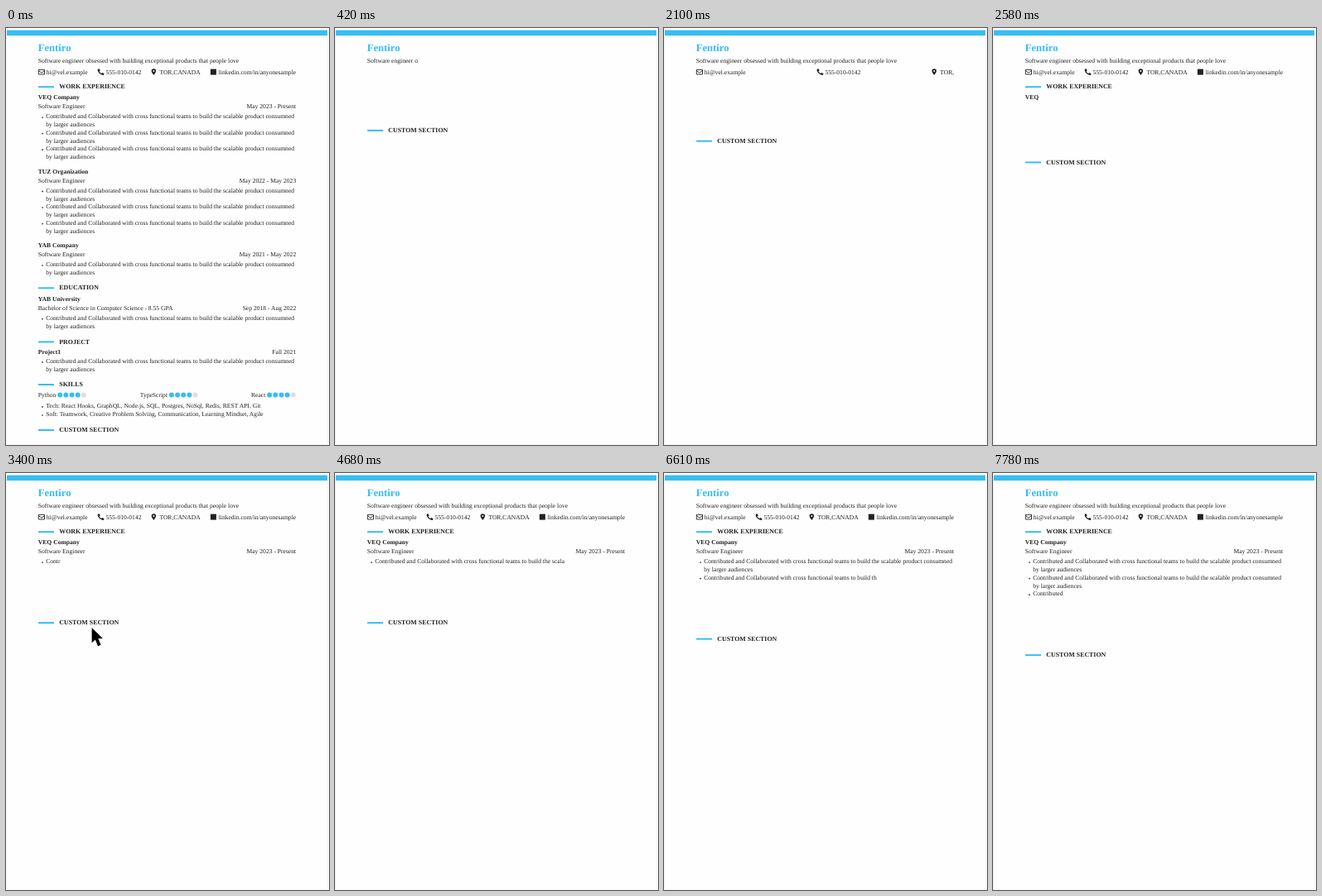
Recreate the animation shown at these times as an HTML page. Size 390 by 504 pixels, loop 8000 ms.

```html
<!DOCTYPE html>
<html lang="en">
<head>
<meta charset="utf-8">
<title>Resume typing</title>
<style>
html, body { margin: 0; width: 100%; height: 100%; overflow: hidden; background: #fefefe; }
svg { display: block; width: 390px; height: 504px; }
text {
  font: 7.6px "Liberation Serif", serif;
  fill: #222;
  white-space: pre;
  text-rendering: geometricPrecision;
}
.bold { font-weight: bold; }
.head { font-weight: bold; font-size: 7.9px; }
.name { font-weight: bold; font-size: 12.65px; fill: #38bdf2; }
.right { text-anchor: end; }
.accent { fill: #38bdf2; }
.ink { fill: #222; }
</style>
</head>
<body>
<svg viewBox="0 0 390 504">
  <path d="M.5 3V503.5H388.5V3" fill="none" stroke="#f5f5f5"/>
  <rect class="accent" x="1" y="2.6" width="387" height="6.6"/>
  <text class="name" x="38.7" y="28.2">Fentiro</text>
  <g id="page"></g>
</svg>
<script>
const LOOP = 8000, LEFT = 38.8, RIGHT = 350.2;
const page = document.getElementById('page');
const pen = document.createElement('canvas').getContext('2d');
pen.font = '76px "Liberation Serif", serif';
const widthOf = s => pen.measureText(s).width / 10;

const tagline = 'Software engineer obsessed with building exceptional products that people love';
const contacts = ['hi@vel.example', '555-010-0142', 'TOR,CANADA', 'linkedin.com/in/anyonesample'];
const role = 'Software Engineer';
const firstLine = 'Contributed and Collaborated with cross functional teams to build the scalable product consumned ';
const duty = firstLine + 'by larger audiences';
const firstJob = ['VEQ Company', 'May 2023 - Present'];

// y values are the vertical middle of a line of capitals
const text = (s, y, x = LEFT, cls = '') => `<text class="${cls}" x="${x}" y="${y + 2.5}">${s}</text>`;
const right = (s, y) => text(s, y, RIGHT, 'right');
const bold = (s, y) => text(s, y, LEFT, 'bold');
const heading = (s, y) =>
  `<rect class="accent" x="39" y="${y - .6}" width="19" height="2"/>` + text(s, y, 64.3, 'head');
const bullet = (s, y) => `<circle class="ink" cx="44" cy="${y + 1.3}" r=".85"/>` + text(s, y, 48.2);
const dutyLines = (s, y) =>
  bullet(s.slice(0, firstLine.length), y) + text(s.slice(firstLine.length), y + 9.9, 48.2);

const icons = [
  '<path d="M.5 -2.6H7.7V3H.5ZM.5 -1.4L4.1 1.2L7.7 -1.4" fill="none" stroke="#222" stroke-width=".9" stroke-linejoin="round"/>',
  '<path class="ink" d="M.3 -3.2L2.2 -3.7L3.2 -1.4L2.1 -.4Q3 1.3 4.7 2.1L5.7 1L8 2L7.5 3.9Q6.5 4.2 5 3.6Q1.2 2 .2 -1.7Z"/>',
  '<path class="ink" fill-rule="evenodd" d="M3 4Q.2 .6 .2 -1A2.8 2.8 0 0 1 5.8 -1Q5.8 .6 3 4ZM3 -2A1 1 0 0 0 3 0A1 1 0 0 0 3 -2Z"/>',
  '<rect class="ink" x=".2" y="-3.4" width="7" height="7"/>'
];

function contactRow(items) {
  const shown = items.filter(Boolean);
  const widths = shown.map(s => 10 + widthOf(s));
  const free = RIGHT - LEFT - widths.reduce((a, b) => a + b, 0);
  const gap = free / Math.max(1, shown.length - 1);
  let x = LEFT;
  return shown.map((s, i) => {
    const out = `<g transform="translate(${x} 53)">${icons[i]}</g>` + text(s, 53.2, x + 10);
    x += widths[i] + gap;
    return out;
  }).join('');
}

function job(y, company, dates, duties) {
  let out = bold(company, y) + text(role, y + 11) + right(dates, y + 11);
  for (let i = 0; i < duties; i++) out += dutyLines(duty, y + 23.1 + i * 19.6);
  return out;
}

function skill(name, x) {
  let out = text(name, 443.5, x);
  const start = x + widthOf(name) + 4.9;
  for (let i = 0; i < 5; i++)
    out += `<circle cx="${start + i * 7.15}" cy="443.6" r="3" fill="${i < 4 ? '#38bdf2' : '#dcdfe3'}"/>`;
  return out;
}

function fullResume() {
  return text(tagline, 39.7) + contactRow(contacts) +
    heading('WORK EXPERIENCE', 70.8) +
    job(83.6, ...firstJob, 3) +
    job(173, 'TUZ Organization', 'May 2022 - May 2023', 3) +
    job(262.6, 'YAB Company', 'May 2021 - May 2022', 1) +
    heading('EDUCATION', 313.9) + bold('YAB University', 327) +
    text('Bachelor of Science in Computer Science - 8.55 GPA', 338) +
    right('Sep 2018 - Aug 2022', 338) + dutyLines(duty, 350.3) +
    heading('PROJECT', 379) + bold('Project1', 391.8) + right('Fall 2021', 391.8) +
    dutyLines(duty, 402.5) +
    heading('SKILLS', 430.6) + skill('Python', LEFT) + skill('TypeScript', 161.8) + skill('React', 296) +
    bullet('Tech: React Hooks, GraphQL, Node.js, SQL, Postgres, NoSql, Redis, REST API, Git', 456.6) +
    bullet('Soft: Teamwork, Creative Problem Solving, Communication, Learning Mindset, Agile', 466.7) +
    heading('CUSTOM SECTION', 485.6);
}

function typedResume(count) {
  const take = s => {
    const part = s.slice(0, Math.max(0, count));
    count -= s.length;
    return part;
  };
  let out = text(take(tagline), 39.7), end = 123.5;
  const row = contacts.map(take);
  if (row[0]) { out += contactRow(row); end = 136.3; }
  const company = take(firstJob[0]);
  if (company) {
    out += heading('WORK EXPERIENCE', 70.8) + bold(company, 83.6);
    end = 162;
  }
  const title = take(role);
  if (title) {
    out += text(title, 94.6) + right(take(firstJob[1]), 94.6);
    end = 171;
  }
  for (let i = 0; i < 3 && count > 0; i++) {
    const part = take(duty);
    out += dutyLines(part, 106.7 + i * 19.6);
    end += part.length > firstLine.length ? 19.5 : 9.7;
  }
  return out + heading('CUSTOM SECTION', end);
}

const pointer = '<path transform="translate(103.6 187)" d="M0 0V18.2L4.2 14.4L7.4 22.2L11 20.7L7.7 13.1H13.3Z" ' +
  'fill="#000" stroke="#fff" stroke-width="1.4" paint-order="stroke"/>';

// Bursts of typing: first change, last change, number of changes
const ticks = [[250, 1280, 8], [1470, 2430, 7], [2580, 3400, 6], [3550, 3620, 2], [3800, 4680, 7],
  [4840, 4840, 1], [5090, 6120, 7], [6300, 6610, 3], [6890, 7780, 6]]
  .flatMap(([from, to, n]) => Array.from({ length: n }, (_, i) => from + (to - from) * i / (n - 1 || 1)));

// Time and number of characters typed by then
const pace = [[250, 11], [1470, 80], [2580, 145], [3400, 193], [4680, 263], [6120, 342], [6610, 372], [7780, 431]];

function typedAt(t) {
  const i = Math.max(1, pace.findIndex(p => p[0] >= t - .01));
  const [t0, n0] = pace[i - 1], [t1, n1] = pace[i];
  return Math.round(n0 + (n1 - n0) * (t - t0) / (t1 - t0));
}

let current = -1;
function draw(now) {
  const t = now % LOOP;
  const tick = ticks.reduce((last, k) => k <= t ? k : last, 0);
  if (tick !== current) {
    current = tick;
    page.innerHTML = tick === 0 ? fullResume()
      : typedResume(typedAt(tick)) + (tick > 3200 && tick < 3800 ? pointer : '');
  }
  requestAnimationFrame(() => draw(performance.now() - start));
}
const start = performance.now();
draw(0);
</script>
</body>
</html>
```
